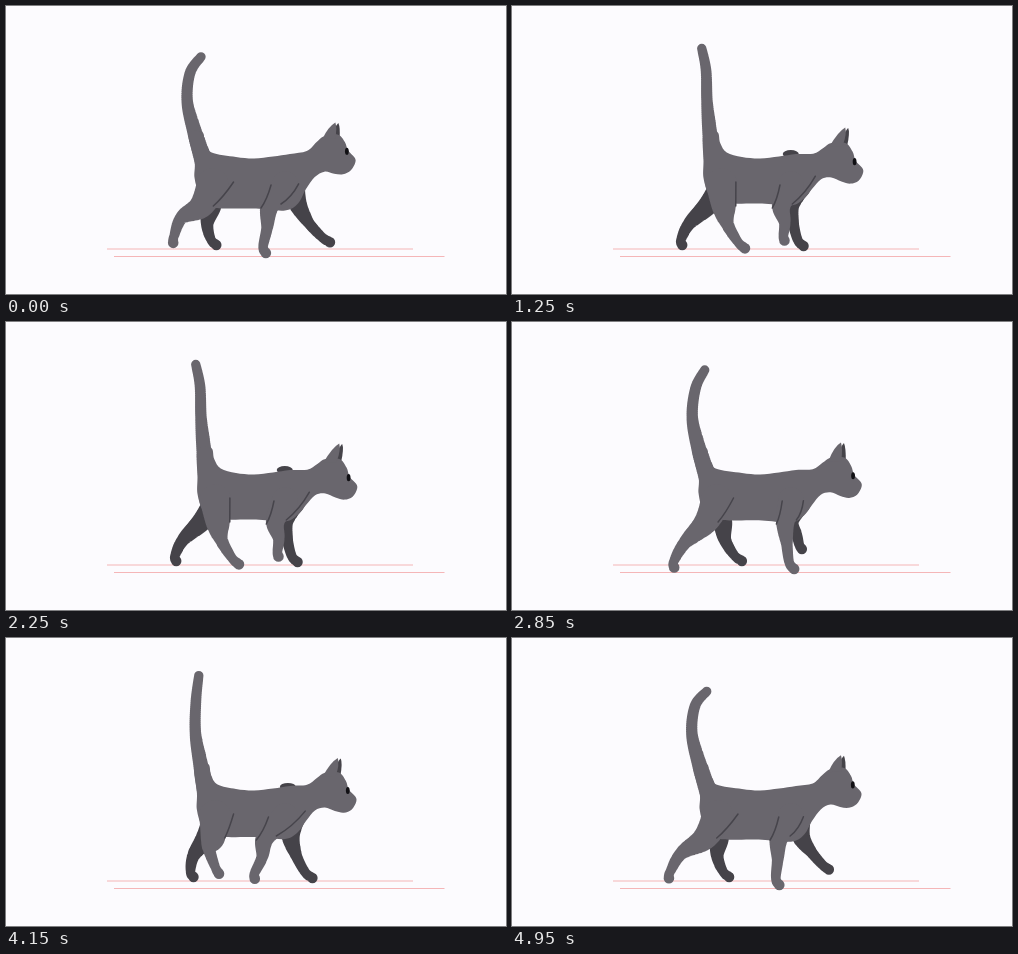
Animation of 500x288 px, one loop 5 s. Source, as an HTML page:

```html
<!DOCTYPE html>
<html lang="en">
<head>
<meta charset="utf-8">
<title>Walking cat</title>
<style>
html, body { margin: 0; width: 100%; height: 100%; overflow: hidden; background: #fcfbfe; }
svg { display: block; width: 100%; height: 100%; }
.fur { fill: #69666d; }
.far { fill: #454349; }
.crease { fill: none; stroke: #46444b; stroke-width: 1.5; stroke-linecap: round; }
.floor { stroke: #f5b6b8; stroke-width: 1.2; }
</style>
</head>
<body>
<svg viewBox="0 0 500 288">
  <path class="floor" d="M101 243H407M108 250.5H438.5"/>
  <path id="farHind" class="far"/>
  <path id="farFore" class="far"/>
  <ellipse id="blade" class="far" rx="8" ry="4"/>
  <path id="farEar" class="far"/>
  <path id="tail" class="fur"/>
  <path id="body" class="fur"/>
  <path id="hind" class="fur"/>
  <path id="fore" class="fur"/>
  <path id="ear" class="fur"/>
  <path id="creases" class="crease"/>
  <ellipse id="eye" rx="1.9" ry="3.6" fill="#111014"/>
</svg>
<script>
const CYCLE = 18, HALF = 9, SWING = 7.5;   // drawings per stride, half stride, paw in the air

// Each joint lies between a fixed pivot and the paw: [pivot x, share of the way to the paw].
const HIND = { liftOff: 16, back: 153, front: 234, drag: 5, ground: 245.5, lift: 11,
  upper: [204.7, 0.25], lower: [188.5, 0.6], upperY: 200, lowerY: 221, fold: 12, push: 0 };
const FORE = { liftOff: 2, back: 245, front: 323, drag: 0, ground: 247, lift: 13,
  upper: [267, 0.42], lower: [263, 0.62], upperY: 199, lowerY: 222, fold: 6, push: 4 };

const mix = (a, b, u) => a + (b - a) * u;
const wave = (n, peak, period = CYCLE) => Math.cos(2 * Math.PI * (n - peak) / period);
const f = v => v.toFixed(2);
const el = id => document.getElementById(id);
const draw = (id, d) => el(id).setAttribute("d", d);
const place = (id, x, y) => { el(id).setAttribute("cx", x); el(id).setAttribute("cy", y); };

// Paw glides back on the ground, then swings forward; the joints follow it.
function leg(g, n, dx = 0, dy = 0) {
  const c = (n - g.liftOff + 2 * CYCLE) % CYCLE;
  let x, up = 0;
  if (c < SWING) {
    const s = c / SWING;
    x = mix(g.back, g.front, s * s * (3 - 2 * s));
    up = Math.sin(Math.PI * s) ** 0.8;
  } else {
    const s = (c - SWING) / (CYCLE - SWING);
    x = mix(g.front, g.back, s) + g.drag * Math.sin(Math.PI * s);
  }
  const toe = [x, g.ground - g.lift * up + dy];
  const upper = [mix(g.upper[0], x, g.upper[1]), g.upperY];
  const lower = [mix(g.lower[0], x, g.lower[1]) + g.push * up, g.lowerY - g.fold * up + dy * 0.5];
  const ankle = [mix(lower[0], x, 0.74) - 3 + 2 * up, mix(lower[1], toe[1], 0.74)];
  return [upper, lower, ankle, toe].map(p => [p[0] + dx, p[1]]);
}

// Catmull-Rom value between b and c.
const blend = (a, b, c, d, u) =>
  b + u / 2 * (c - a + u * (2 * a - 5 * b + 4 * c - d + u * (3 * (b - c) + d - a)));

// Tapered rounded limb: discs swept along a smooth curve.
function limb(pts, radii, steps = 16) {
  let d = "";
  const last = pts.length - 1, at = i => pts[Math.max(0, Math.min(last, i))];
  for (let i = 0; i < last; i++) {
    for (let k = 0; k <= steps; k++) {
      const u = k / steps, r = f(mix(radii[i], radii[i + 1], u));
      const [x, y] = [0, 1].map(c => blend(at(i - 1)[c], at(i)[c], at(i + 1)[c], at(i + 2)[c], u));
      d += `M${f(x - r)} ${f(y)}a${r} ${r} 0 1 1 ${2 * r} 0a${r} ${r} 0 1 1 ${-2 * r} 0`;
    }
  }
  return d;
}

// Smooth closed outline through points.
function outline(pts) {
  const n = pts.length, at = i => pts[(i + n) % n];
  let d = "M" + at(0).map(f);
  for (let i = 0; i < n; i++) {
    const [a, b, c, e] = [at(i - 1), at(i), at(i + 1), at(i + 2)];
    const h1 = [0, 1].map(k => f(b[k] + (c[k] - a[k]) / 6));
    const h2 = [0, 1].map(k => f(c[k] - (e[k] - b[k]) / 6));
    d += `C${h1} ${h2} ${c.map(f)}`;
  }
  return d + "Z";
}

const fold = (x, y, x2, y2, bend) =>
  `M${f(x)} ${f(y)}Q${f((x + x2) / 2 + bend)} ${f((y + y2) / 2 + 3)} ${f(x2)} ${f(y2)}`;

// The tail sways as one, while its tip curls the opposite way.
function tailPoints(n, base) {
  const bow = 189.5 + 6.5 * wave(n, 7.3);
  const tipY = 45.5 + 8 * wave(n, 7.8, HALF);
  return [
    [base, 158],
    [192.5 + 6 * wave(n, 6.5), 126],
    [188.5 + 9 * wave(n, 7.2), 95],
    [bow, mix(65, tipY + 20, 0.3)],
    [bow + 1 + 10.5 * wave(n, -1), tipY]];
}

function drawLegs(n, base) {
  const hind = leg(HIND, n), fore = leg(FORE, n);
  const farFore = leg(FORE, n + HALF, 2, -7);
  draw("hind", limb([[base + 8, 178], ...hind], [16, 12, 6.5, 4.7, 5.3]));
  draw("farHind", limb([[base + 7, 182], ...leg(HIND, n + HALF, -1, -6.5)], [12, 10, 6.3, 4.7, 5.2]));
  draw("fore", limb([[279, 178], ...fore], [13, 9.5, 5.8, 4.8, 5.3]));
  draw("farFore", limb([[286, 180], ...farFore], [13, 9, 5.6, 4.8, 5.2]));
  place("blade", mix(279, farFore[0][0], 0.5), 152 - 4 * wave(n, 5));

  const knee = hind[0][0], elbow = fore[0][0], shoulder = wave(n, 7);
  draw("creases",
    fold(221.5 + 7 * wave(n, 1.5), 176, knee + 12, 200, 0) +
    fold(mix(270, elbow - 3, 0.55), 179, elbow - 9, 202, 1) +
    fold(298 + 7 * shoulder, 174 - 5 * shoulder, elbow + 11, 198, 2));
}

function drawBody(n, base, root) {
  const bob = wave(n, 0.2, HALF), belly = 200 + 2.5 * bob;
  const dx = 1.2 * wave(n, 8), dy = 5.5 - 5.3 * bob;
  const mv = (x, y, k = 1) => [x + dx * k, y + dy * k];

  draw("body", outline([
    [root - 6, 128], [root + 7.5, 126], [root + 10.5, 137], [root + 17, 146.5], [230, 151],
    [248, 152.5], [267, 150.5], [284, 148], mv(301, 145, 0.25), mv(311, 136, 0.55),
    mv(319, 130, 0.65), mv(333, 128.5, 0.8), mv(340, 136, 0.9), mv(343, 144), mv(349.5, 151),
    mv(350.5, 156), mv(346, 164), mv(338, 168, 0.9), mv(329, 167.5, 0.75), mv(319, 165.5, 0.55),
    mv(309, 171, 0.2), [300, 183], [292, belly - 5], [279, belly + 2], [250, belly],
    [220, belly], [205, belly - 2], [base - 5, 188], [base - 10, 172], [base - 10, 155]]));

  const ax = 331.3 + 2.5 * wave(n, 7), ay = 119 - 2.5 * bob;
  const [left, right, rim] = [mv(317, 133, 0.7), mv(330, 132, 0.8), mv(334.5, 132, 0.8)];
  draw("ear", `M${left}Q${ax - 7} ${ay + 4} ${ax} ${ay}Q${ax + 2} ${ay + 6} ${right}Z`);
  draw("farEar", `M${mv(324, 133, 0.8)}Q${ax} ${ay + 3} ${ax + 3} ${ay + 0.5}Q${ax + 5} ${ay + 5} ${rim}Z`);
  place("eye", 342 + dx, 145 + dy);
}

function pose(n) {
  const base = 199 + 2.5 * wave(n, 5), tail = tailPoints(n, base);
  draw("tail", limb(tail, [9.5, 7.5, 5.8, 5.4, 4.7]));
  drawBody(n, base, tail[1][0]);
  drawLegs(n, base);
}

// Nine drawings each half second; the sixth is held twice as long.
function drawingAt(ms) {
  const t = ms % 1000, slot = Math.floor((t % 500) / 50);
  return (slot > 5 ? slot - 1 : slot) + (t >= 500 ? HALF : 0);
}

const start = performance.now();
let shown = -1;
function tick() {
  const n = drawingAt(performance.now() - start);
  if (n !== shown) pose(shown = n);
  requestAnimationFrame(tick);
}
tick();
</script>
</body>
</html>
```
